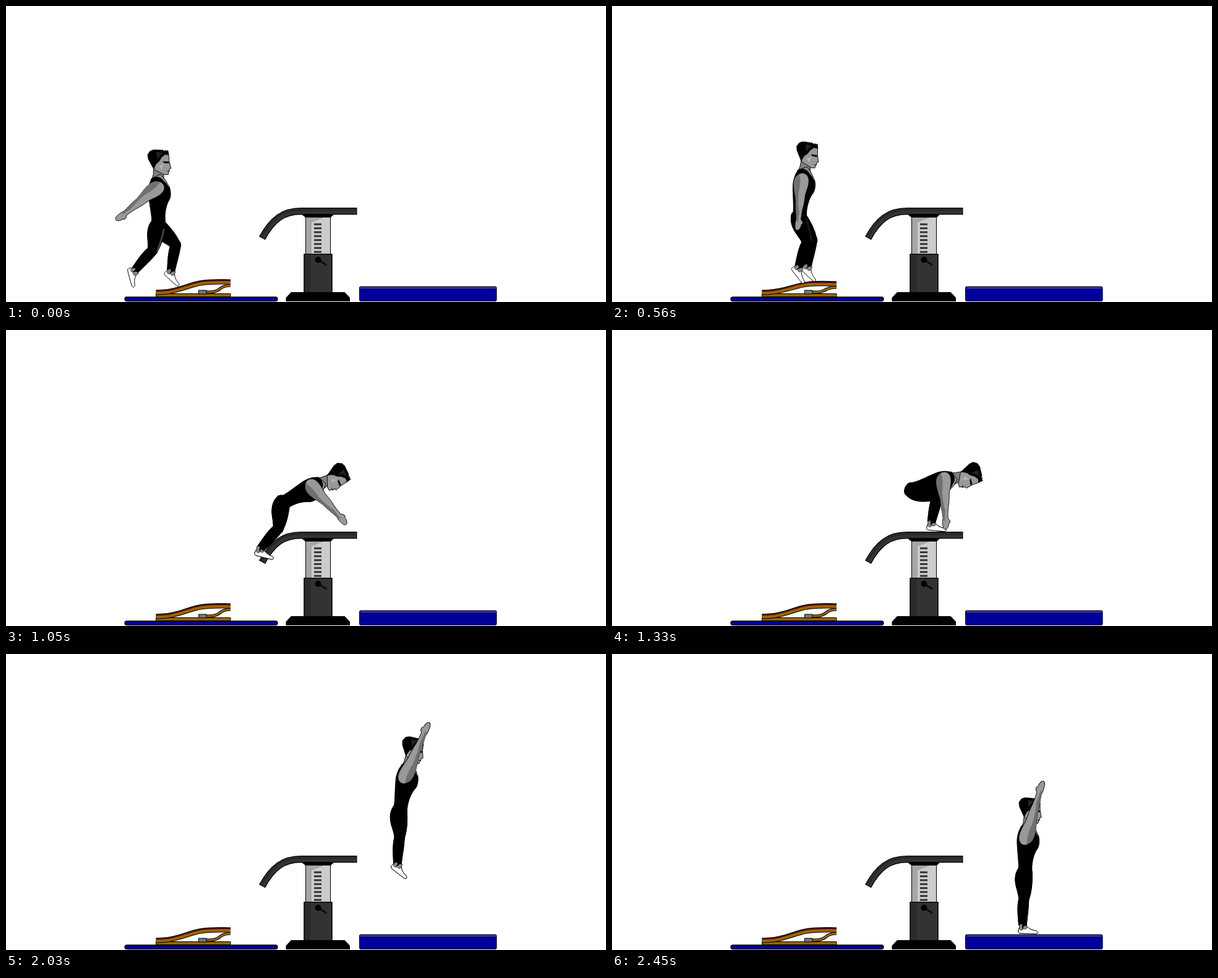
These frames come from a looping animation (970 px wide and 480 px high, 2.87 s). An HTML page:

```html
<!DOCTYPE html>
<html lang="en">
<head>
<meta charset="utf-8">
<title>Squat vault</title>
<style>
html, body { margin: 0; width: 100%; height: 100%; overflow: hidden; background: #fff; }
svg { display: block; }
</style>
</head>
<body>
<svg id="stage" width="970" height="480" viewBox="0 0 970 480" stroke-linejoin="round">
  <g stroke="#000">
    <rect x="192" y="472" width="247" height="6.5" rx="3.2" fill="#000099" stroke-width="1.3"/>
    <rect x="571.5" y="455" width="221.5" height="23.5" rx="2" fill="#000099"/>
    <path d="M573 457H792" stroke="#3333a8" stroke-width="3"/>
    <path d="M572 459.5H793" stroke-width=".6"/>
  </g>
  <g id="board"></g>
  <g id="horse">
    <path d="M484.5 342H524.5V403H484.5Z" fill="#ccc" stroke="#000"/>
    <path d="M485 343H514L494 351V402H485Z" fill="#a6a6a6"/>
    <g id="slots" fill="#333"></g>
    <path d="M478 338H530L525 343H484Z"/>
    <path d="M482 402.5H527V465H482Z" fill="#333" stroke="#000" stroke-width="1.5"/>
    <path d="M483 403.5H493V464H483Z" fill="#2b2b2b"/>
    <circle cx="504.5" cy="411.5" r="5"/>
    <path d="M504 411L517 419.5" stroke="#000" stroke-width="2.4"/>
    <circle cx="517" cy="419.5" r="1.3" fill="#333" stroke="#000"/>
    <path d="M452.5 479V473L461 464H547.5L556 473V479Z"/>
    <g fill="none">
      <path d="M414 376.5C431 345 449 332.8 477 332.8H567.5" stroke="#000" stroke-width="11.4"/>
      <path d="M414.6 375.5C431 345 449 332.8 477 332.8H566.5" stroke="#333" stroke-width="9"/>
      <path d="M412.5 375C430 342 449 330.5 477 330.5H566.5" stroke="#282828" stroke-width="3.5"/>
    </g>
  </g>
  <g id="gymnast" stroke="#000" stroke-width=".9"></g>
</svg>
<script>
const $ = id => document.getElementById(id);
const STEP = 70, HOLD = 420, LOOP = 2870, LAST = 30;
const THIGH = 42, SHIN = 44.5, ANKLE = 12;
const rad = deg => deg * Math.PI / 180, deg = r => r * 180 / Math.PI;
const clamp = (v, lo, hi) => Math.min(hi, Math.max(lo, v));
const mix = (a, b, u) => a + (b - a) * u;

// Angles are clockwise from standing with the arm hanging; legs are [thigh, shin].
// arc lifts the hip on a parabola on the way to the next pose.
const poses = [
  { at: 0, hip: [247, 356], lean: -2, arm: 52, near: [14, 40], far: [-41, 9] },
  { at: 1, hip: [258, 345], lean: 2, arm: 45, near: [-1, 32], far: [-37, 6], arc: 12 },
  { at: 4, hip: [326, 358], lean: 6, arm: -15, near: [-25, 10] },
  { at: 6, hip: [364, 333], lean: 24, arm: -88, near: [13, 14] },
  { at: 8, hip: [428, 316], lean: 55, arm: -62, near: [52, 54], arc: 18 },
  { at: 14, hip: [486, 259], lean: 73, arm: -2, near: [-74, 12] },
  { at: 16, hip: [504, 240], lean: 37, arm: -40, near: [-32, 13] },
  { at: 19, hip: [547, 213], lean: 19, arm: -145, near: [7, 9], arc: 45 },
  { at: 24, hip: [637, 256], lean: 9, arm: -156, near: [1, 3], arc: -62 },
  { at: LAST, hip: [668, 356], lean: 2, arm: -163, near: [3, 1] }
];

const legParts = side => `
  <g id="${side}Foot">
    <path d="M-6 0C-8 5 -9 9 -6 10.5C2 11 12 11 20 11C24 11 25 8 21 6C14 5 9 3 6 -1Z" fill="#fff"/>
    <path d="M-6.5 -5L-6.5 4Q-2 8 0 3Q3 5 6 2L5 -5Z" fill="#888" stroke-width=".5"/>
    <path d="M-2 -5L-1 3L1 -5Z"/>
  </g>
  <path id="${side}Shin" d="M-8 -1C-11 12 -9 26 -7.5 42L-3 39L0 43L5 42C6 28 8 15 8 0A8 8 0 0 0 -8 -1Z"/>
  <path id="${side}Thigh" d="M-10 -10C-16 -1 -17 8 -14 20C-11 30 -9 34 -8 42A8 8 0 0 0 8 42C11 33 13 17 11 -3C10 -13 -4 -15 -10 -10Z"/>`;

$('gymnast').innerHTML = `
  ${legParts('far')}${legParts('near')}
  <path id="crease" d="M9 -2C11 14 9 29 7.5 42" fill="none" stroke="#444" stroke-width="2.6"/>
  <g id="head">
    <path d="M-8 -14Q-8 -4 -12 6L9 9L7 -5Z" fill="#808080"/>
    <path d="M-8 -14L-4 -28L6 -38L17 -36L17.5 -25L20 -13L17 -12L17.5 -9L16 -7L15 -3L9 -3L-6 -11Z" fill="#999"/>
    <path d="M1 -17L8 -21L5 -11Z" fill="#b5b5b5" stroke="none"/>
    <path d="M7 -25L17 -24V-21L9 -22ZM12 -8.5L17 -9V-7.5Z" stroke="none"/>
    <path d="M-17 -36L-13 -42L-7 -44L8 -43L10 -41L12 -43L12 -41L16 -42L17 -35L11 -36L5 -31L1 -25L-4 -21L-8 -13L-16 -29Z"/>
    <path d="M-3 -40L8 -39L3 -35L-1 -28Z" fill="#222" stroke="none"/>
  </g>
  <g id="torso">
    <path d="M-10 -76L5 -83Q13 -76 18 -64L18 -52L2 -52Z" fill="#8c8c8c"/>
    <path d="M-12 5L-11 -8C-11 -20 -14 -35 -15 -52C-15 -63 -12 -72 -8 -77C-2 -80 6 -79 10 -72Q15 -68 18 -61L19 -63C22 -55 21 -46 19 -42C14 -35 11 -24 10.5 -12L11 5Z"/>
  </g>
  <g id="arm">
    <path d="M-9 -8C-4 -16 6 -16 10 -6C13 4 9 16 7.5 24C7 34 7 42 5 52C4 60 4 66 4 71L7 75L7 79L5 80C5 86 2 91 -1 91C-5 90 -5 84 -5 76L-4 70C-5 58 -7 50 -7 40C-8 30 -13 16 -13 6C-13 -2 -11 -6 -9 -8Z" fill="#999"/>
    <path d="M-9 -8L-5 -11C-1 2 -3 14 -4 24C-3 36 -3 45 0 56L-1 76L-4 74L-4 70C-5 58 -7 50 -7 40C-8 30 -13 16 -13 6C-13 -2 -11 -6 -9 -8Z" fill="#707070" stroke="none"/>
  </g>`;

$('slots').innerHTML = Array.from({ length: 8 }, (_, i) =>
  `<rect x="498" y="${352.5 + i * 6.4}" width="12" height="3"/>`).join('');

function poseAt(step) {
  const i = Math.max(0, poses.findIndex(p => p.at >= step) - 1);
  const a = poses[i], b = poses[i + 1], u = (step - a.at) / (b.at - a.at);
  const pair = (p, q) => p.map((v, j) => mix(v, q[j], u));
  const [x, y] = pair(a.hip, b.hip);
  return {
    hip: { x, y: y - (a.arc ?? 0) * 4 * u * (1 - u) },
    lean: mix(a.lean, b.lean, u),
    arm: mix(a.arm, b.arm, u),
    near: pair(a.near, b.near),
    far: pair(a.far ?? a.near, b.far ?? b.near)
  };
}

// Height of whatever lies below x.
function floorAt(x, dip) {
  if (x > 570) return 455;
  if (x > 410) return 327.5 + 46 * clamp((470 - x) / 60, 0, 1) ** 2;
  if (x < 242 || x > 363) return 471;
  const u = (x - 242) / 121;
  return mix(461, 444 + dip, u * u * (3 - 2 * u));
}

// Point (dx, dy) of a part that is turned by angle around p.
function attach(p, angle, dx, dy) {
  const c = Math.cos(rad(angle)), s = Math.sin(rad(angle));
  return { x: p.x + dx * c - dy * s, y: p.y + dx * s + dy * c };
}

const heading = (from, to) => deg(Math.atan2(from.x - to.x, to.y - from.y));

function place(id, p, angle, scale = 1) {
  $(id).setAttribute('transform', `translate(${p.x} ${p.y}) rotate(${angle}) scale(1 ${scale})`);
}

// Bends the knee where the foot would sink into the floor and returns that depth.
function placeLeg(side, hip, [thigh, shin], dip) {
  let knee = attach(hip, thigh, 0, THIGH);
  const ankle = attach(knee, shin, 0, SHIN);
  const clearance = floorAt(ankle.x, dip) - ANKLE - ankle.y;
  if (clearance < 0) {
    ankle.y += clearance;
    const reach = Math.hypot(ankle.x - hip.x, ankle.y - hip.y);
    const bend = (THIGH ** 2 + reach ** 2 - SHIN ** 2) / (2 * THIGH * reach);
    thigh = heading(hip, ankle) - deg(Math.acos(clamp(bend, -1, 1)));
    knee = attach(hip, thigh, 0, THIGH);
    shin = heading(knee, ankle);
  }
  place(side + 'Thigh', hip, thigh);
  place(side + 'Shin', knee, shin);
  place(side + 'Foot', ankle, (shin + 34) * clamp(clearance / 16, 0, 1));
  return Math.max(0, -clearance);
}

function drawBoard(dip) {
  const curve = y => `M242.5 ${461 + y}C277 ${461 + y} 293 ${449 + y + dip * .4} 316 ${445.5 + y + dip * .7}`
    + `C335 ${442.5 + y + dip} 350 ${444 + y + dip} 363 ${444 + y + dip}`;
  const spring = `M324 464C350 465 341 ${454 + dip * .7} 363 ${453 + dip}`;
  const line = (d, color, width) => `<path d="${d}" stroke="${color}" stroke-width="${width}"/>`;
  $('board').innerHTML = `<g fill="none">
    ${line(spring, '#000', 5)}${line(spring, '#960', 3)}
    <rect x="242.5" y="466.5" width="120.5" height="5" fill="#960" stroke="#000"/>
    <rect x="311.5" y="461" width="12.5" height="6" fill="#777" stroke="#000"/>
    ${line(curve(3.5), '#000', 8.5)}${line(curve(4.5), '#960', 4.5)}${line(curve(1), '#900', 1.1)}</g>`;
}

function draw(time) {
  const t = time % LOOP;
  const step = t < HOLD ? 0 : Math.min(LAST, 1 + Math.floor((t - HOLD) / STEP));
  const { hip, lean, arm, near, far } = poseAt(step);
  const dip = Math.max(0, 8 - 5 * Math.abs(step - 4));
  drawBoard(dip);

  placeLeg('far', hip, far, dip);
  const sink = placeLeg('near', hip, near, dip);
  place('crease', hip, near[0]);
  $('crease').setAttribute('opacity', clamp(Math.abs(far[0] - near[0]) / 30, 0, 1));

  // The back rounds as it leans, and crouching leans it further.
  const back = lean + sink * .6;
  const spine = .85 + .15 * Math.cos(rad(back));
  place('torso', hip, back, spine);
  place('head', attach(hip, back, 3, -79 * spine), back);
  place('arm', attach(hip, back, -1, -60 * spine), arm, .965 - .075 * Math.cos(rad(arm)));
}

let start;
function tick(now) {
  start ??= now;
  draw(now - start);
  requestAnimationFrame(tick);
}
draw(0);
requestAnimationFrame(tick);
</script>
</body>
</html>
```
